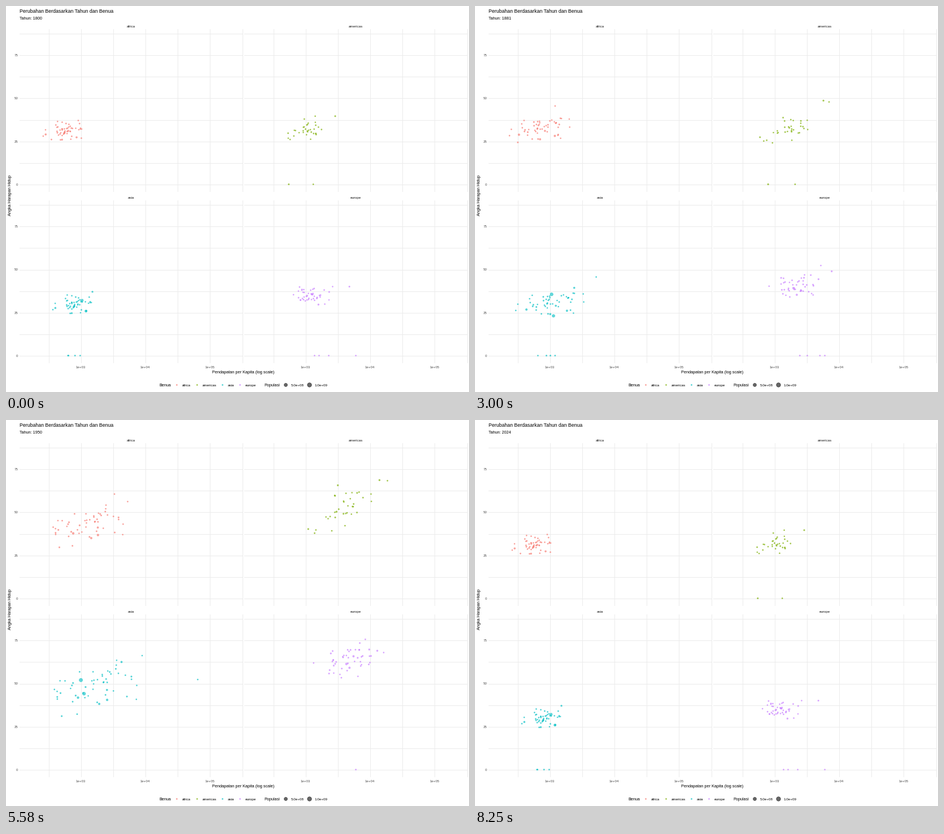
A matplotlib script for the animation above (8330 ms loop, 820 by 683 pixels).

```python
import matplotlib.pyplot as plt
import numpy as np
from matplotlib.animation import FuncAnimation

W, H, DPI = 820, 683, 64
PX = 72 / DPI                      # points per pixel
FRAMES, LOOP = 100, 8330
DECADE, PER_YEAR = 114.2, 3.052    # pixels per log10 unit / per year of life
FIRST, LAST = 1800, 2024
KEYS = [FIRST, 1906, 1952, 1981, 1995, LAST]
RECORDS = 1950                     # life expectancy known everywhere

plt.rcParams["font.family"] = "Liberation Sans"
fig = plt.figure(figsize=(W / DPI, H / DPI), dpi=DPI, facecolor="white")
ax = fig.add_axes([0, 0, 1, 1])
ax.set_xlim(0, W)
ax.set_ylim(H, 0)
ax.axis("off")


def label(x, y, text, size, color="black", ha="left", va="baseline", **kw):
    return ax.text(x, y, text, fontsize=size * PX, color=color, ha=ha, va=va, **kw)


def area(pop):
    return ((1.8 + 6.9 * np.sqrt(np.asarray(pop) / 1.45e9)) * PX) ** 2


def dots(x, y, pop, color):
    return ax.scatter(x, y, s=area(pop), color=color, alpha=0.6,
                      linewidths=0.7 * PX, zorder=3)


class Continent:
    """A seeded cloud of countries plus a few tracks for the notable ones."""

    def __init__(self, name, color, col, row, count, mean_x, mean_y,
                 sd_x, sd_y, tracks, blanks=()):
        self.name, self.color = name, color
        self.left, self.top = 24 + 398 * col, 41 + 303 * row
        self.x0, self.y0 = 132.5 + 398 * col, 315.5 + 303.1 * row
        self.mean_x, self.mean_y = mean_x, mean_y
        self.sd_x, self.sd_y = sd_x, sd_y
        self.blanks = blanks
        # after the last known point a track drifts along with its continent
        dx, dy = mean_x[-1] - mean_x[-2], mean_y[-1] - mean_y[-2]
        self.tracks = [(xs + [xs[-1] + dx / 2], ys + [ys[-1] + dy / 2], pop)
                       for xs, ys, pop in tracks]
        rng = np.random.default_rng(count)
        self.z = rng.uniform(-1, 1, (4, count, 3)).sum(axis=2)
        self.pop = np.append(9e6 * rng.lognormal(0, 1.2, count),
                             [t[2] for t in tracks])
        self.flu = rng.uniform(3, 14, len(self.pop))

    def state(self, year):
        mx = np.interp(year, KEYS, self.mean_x)
        my = np.interp(year, KEYS, self.mean_y)
        age = (year - FIRST) / (LAST - FIRST)
        sx = 0.14 + (self.sd_x - 0.14) * min(1, age * 1.2)
        sy = np.interp(year, KEYS[:3] + [LAST], [2.8, 4, *self.sd_y])
        r = 0.15 + 0.55 * age
        # ranks shuffle slowly over the two centuries
        a, b = np.cos(age), np.sin(age)
        u = a * self.z[0] + b * self.z[1]
        v = a * self.z[2] + b * self.z[3]
        x = mx + sx * u
        y = my + sy * (r * u + np.sqrt(1 - r * r) * v)
        x = np.append(x, [np.interp(year, KEYS, t[0]) for t in self.tracks])
        y = np.append(y, [np.interp(year, KEYS, t[1]) for t in self.tracks])
        pop = self.pop * np.interp(year, [FIRST, RECORDS, LAST], [0.15, 0.4, 1])
        if year == 1918:
            y = y - self.flu
        # countries without life expectancy sit on zero until records begin
        for i, (start, end) in enumerate(self.blanks):
            until = 2000 if start == end else RECORDS
            if year < until:
                x[i], y[i] = np.interp(year, KEYS[:2], [start, end]), 0
        return x, y, pop

    def draw_panel(self):
        grid = dict(color="#EBEBEB", lw=PX, antialiased=False, zorder=1)
        for i in range(7):
            x = int(self.x0 + DECADE / 2 * (i - 1)) + 0.5
            ax.plot([x, x], [self.top, self.top + 287], **grid)
        for i in range(8):
            y = int(self.y0 - PER_YEAR * 12.5 * i) + 0.5
            ax.plot([self.left, self.left + 394], [y, y], **grid)
        label(self.left + 197, self.top - 3, self.name, 6.3, "#1A1A1A", "center")
        self.art = dots([], [], [], self.color)

    def update(self, year):
        x, y, pop = self.state(year)
        self.art.set_offsets(np.column_stack([
            self.x0 + DECADE * (x - 3), self.y0 - PER_YEAR * y]))
        self.art.set_sizes(area(pop))


continents = [
    Continent(
        "africa", "#F8766D", 0, 0, 52,
        [2.78, 2.94, 3.16, 3.42, 3.41, 3.62], [30.7, 33.5, 44.5, 55, 57, 65],
        0.36, (6, 5.2),
        [([2.96, 3.12, 3.54, 3.95, 4.22], [37, 48, 61, 71, 75], 4e6)]),
    Continent(
        "americas", "#7CAE00", 1, 0, 33,
        [3.02, 3.28, 3.6, 3.94, 4, 4.18], [32, 33, 54, 70, 71.5, 76],
        0.24, (7, 3),
        [([3.46, 3.85, 4.16, 4.51, 4.6], [39.5, 51.3, 69.3, 76, 78], 6e7),
         ([3.15, 4.06, 4.28, 4.54, 4.67], [39.5, 50.3, 69, 74.5, 76], 5e6),
         ([3, 3.3, 3.51, 3.38, 3.08], [32, 33, 67, 70.6, 73], 5e7)],
        [(2.74, 2.95), (3.12, 3.38)]),
    Continent(
        "asia", "#00BFC4", 0, 1, 52,
        [2.93, 3.11, 3.28, 3.58, 3.73, 4.08], [29.4, 31.2, 51, 62, 67, 74],
        0.43, (8, 4.3),
        [([3.02, 3.03, 3, 3.12, 3.49], [32, 36.6, 52.6, 65.4, 70], 1.4e9),
         ([3.08, 3.05, 3.05, 3.24, 3.41], [25.8, 22.2, 45, 56, 62], 1e9),
         ([3.18, 3.44, 3.64, 4.41, 4.58], [37, 40, 63.4, 77.5, 80.5], 1.2e8),
         ([2.81, 4, 4.85, 5.09, 5], [29, 50.7, 52.3, 68, 71.6], 3e6)],
        [(2.8, 2.82), (2.81, 2.99), (2.91, 3.04), (2.99, 3.11)]),
    Continent(
        "europe", "#C77CFF", 1, 1, 46,
        [3.1, 3.48, 3.75, 4.24, 4.23, 4.58], [35, 42.5, 65.5, 73, 74.5, 79.5],
        0.25, (5.5, 2.4),
        [([3.2, 3.39, 3.76, 4.16, 4.21], [29.6, 37, 67, 66, 65], 1.4e8),
         ([3.68, 3.95, 4.12, 4.49, 4.63], [40, 51.6, 69.7, 73.6, 78], 6e7),
         ([3.42, 3.81, 4.23, 4.91, 5.14], [40, 56, 68.4, 76, 79], 3e6)],
        [(3.14, 3.47), (3.21, 3.6), (3.36, 3.81), (3.78, 3.78)]),
]
for c in continents:
    c.draw_panel()

# titles and axes
GREY = "#4D4D4D"
label(24.5, 11.7, "Perubahan Berdasarkan Tahun dan Benua", 8.76)
year_text = label(24.5, 23.5, "", 7.3)
label(420.5, 650.3, "Pendapatan per Kapita (log scale)", 7.4, ha="center")
label(8, 335, "Angka Harapan Hidup", 7.4, ha="center", va="center", rotation=90)
for c in continents[2:]:
    for i in range(3):
        label(c.x0 + DECADE * i, 640.6, f"1e+0{3 + i}", 6.1, GREY, "center")
for c in continents[::2]:
    for age in range(0, 100, 25):
        label(21.3, c.y0 + 2.4 - PER_YEAR * age, str(age), 6.1, GREY, "right")

# legend
label(271, 673, "Benua", 7.3)
for c, x in zip(continents, (302, 338, 383, 414)):
    dots([x], [670], [2e6], c.color)
    label(x + 10, 673, c.name, 6.25)
label(457.5, 673, "Populasi", 7.3)
for x, pop, text in ((495, 5e8, "5.0e+08"), (536.5, 1e9, "1.0e+09")):
    dots([x], [670], [pop], "black")
    label(x + 9.5, 673, text, 6.3)


def update(i):
    year = min(FIRST + 225 * i // (FRAMES - 1), LAST)
    year_text.set_text(f"Tahun: {year}")
    # the last step wraps back to the opening state
    shown = FIRST if i == FRAMES - 1 else year
    for c in continents:
        c.update(shown)
    return [year_text] + [c.art for c in continents]


anim = FuncAnimation(fig, update, frames=FRAMES, interval=LOOP / FRAMES,
                     repeat=True, repeat_delay=0, blit=False)
plt.show()
```
